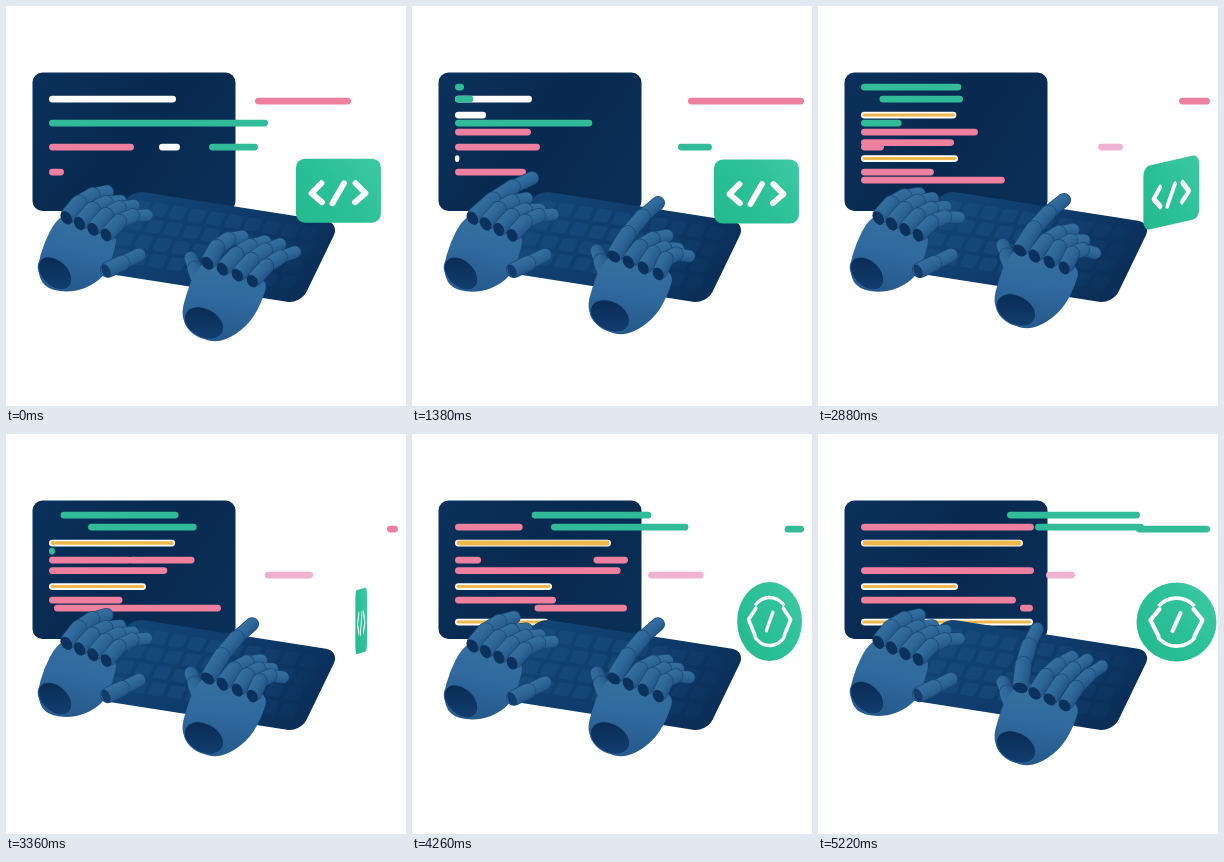
Recreate the animation shown at these times as an HTML page with a canvas. Size 400 by 400 pixels, loop 5.28 s.

```html
<!DOCTYPE html>
<html lang="en">
<head>
<meta charset="utf-8">
<title>Robot hands typing code</title>
<style>
html, body { margin: 0; width: 100%; height: 100%; overflow: hidden; background: #fff; }
canvas { display: block; width: 400px; height: 400px; }
</style>
</head>
<body>
<canvas id="stage"></canvas>
<script>
const LOOP = 5280, STEP = 60, EDGE = 43;
const canvas = document.getElementById('stage');
const ratio = window.devicePixelRatio || 1;
canvas.width = canvas.height = Math.round(400 * ratio);
const c = canvas.getContext('2d');
const PINK = '#ee7f9f', GREEN = '#31bb98', WHITE = '#ffffff', YELLOW = '#efb84f', ROSE = '#f0b2d2';

const clamp = (v, a = 0, b = 1) => Math.max(a, Math.min(b, v));
const mix = (a, b, u) => a + (b - a) * u;
const ease = (t, from, to) => {
  const u = clamp((t - from) / (to - from));
  return u * u * (3 - 2 * u);
};
const pulse = (t, peak, reach) => ease(t, peak - reach, peak) - ease(t, peak, peak + reach);

// Straight moves between (time, value) pairs, held at both ends.
const path = (...p) => t => {
  let i = 0;
  while (i < p.length - 4 && t >= p[i + 2]) i += 2;
  return mix(p[i + 1], p[i + 3], clamp((t - p[i]) / (p[i + 2] - p[i])));
};

function gradient(x0, y0, x1, y1, ...stops) {
  const g = c.createLinearGradient(x0, y0, x1, y1);
  stops.forEach((s, i) => g.addColorStop(i / (stops.length - 1), s));
  return g;
}

function box(x, y, w, h, r, fill) {
  c.beginPath();
  c.roundRect(x, y, w, h, r);
  c.fillStyle = fill;
  c.fill();
}

function oval(x, y, rx, ry, rot, fill) {
  c.beginPath();
  c.ellipse(x, y, rx, ry, rot, 0, Math.PI * 2);
  c.fillStyle = fill;
  c.fill();
}

function line(points, width, color) {
  c.beginPath();
  points.forEach(([x, y]) => c.lineTo(x, y));
  c.lineWidth = width;
  c.lineCap = c.lineJoin = 'round';
  c.strokeStyle = color;
  c.stroke();
}

// ---- code bars: shown from one time to another, each end has its own path ----
const bars = [];
const hold = x => () => x;
const edge = hold(EDGE);
const bar = (color, y, from, to, left, right) => bars.push({ color, y, from, to, left, right });

bar(WHITE, 93, 0, 1950, edge, path(0, 170, 1380, 120));
bar(PINK, 95, 0, 3950, t => 249 + 141 * ease(t, 400, 3900), path(0, 345, 1000, 392));
bar(GREEN, 95, 4000, LOOP, path(3920, 392, 5220, 318), hold(392));
bar(GREEN, 81, 1230, LOOP, path(3200, EDGE, 5220, 189), path(1230, EDGE, 3780, 198, 5220, 322));
bar(GREEN, 93, 1150, LOOP, path(2450, EDGE, 3780, 100, 5220, 217), path(1050, EDGE, 2880, 145, 4780, 326));
bar(PINK, 93, 3820, LOOP, edge, path(3780, EDGE, 4680, 170, 5220, 216));
bar(YELLOW, 109, 500, LOOP, edge, path(300, EDGE, 2280, 100, 3780, 196, 5220, 205));
bar(GREEN, 117, 0, 3400, edge, path(0, 262, 2280, 127, 3400, 46));
bar(PINK, 126, 450, 3000, edge, path(400, EDGE, 1380, 119, 2280, 160));
bar(PINK, 126, 3000, 5100, edge, path(3000, 165, 3780, 80, 5100, 50));
bar(PINK, 126, 3000, 4740, path(3000, 100, 3780, 148, 4740, 215), path(3000, 165, 3780, 216));
bar(PINK, 136.5, 2000, LOOP, edge, path(2100, 95, 4400, 216));
bar(PINK, 141, 0, 3150, edge, path(1900, 128, 3100, 52));
bar(WHITE, 141, 0, 700, path(0, 153, 700, 168), hold(174));
bar(GREEN, 141, 0, 2500, path(0, 203, 1380, 266, 2400, 293), path(0, 252, 1050, 300));
bar(ROSE, 141, 2500, LOOP, path(2500, 297, 3780, 240, 5220, 228), path(2500, 303, 3780, 309, 5220, 257));
bar(YELLOW, 152.5, 1340, LOOP, edge, path(1330, EDGE, 2450, 140));
bar(PINK, 166, 0, LOOP, edge, path(0, 58, 1380, 114, 3780, 117, 5220, 198));
bar(PINK, 174, 1540, LOOP, path(3300, EDGE, 5220, 202), path(1500, EDGE, 3150, 215));
bar(YELLOW, 188, 3600, LOOP, edge, path(3580, EDGE, 4680, 194, 5220, 215));

function drawBars(t) {
  for (const { color, y, from, to, left, right } of bars) {
    if (t < from || t > to) continue;
    const l = left(t), w = Math.max(4, right(t) - l);
    const warm = color === YELLOW;
    box(l, y - 3.3, w, 6.8, 3.4, warm ? WHITE : color);
    if (warm && t > 1500 && w > 6) {
      const core = 2.8 * ease(t, 1400, 2400) + (y < 110 ? 2 * ease(t, 2900, 3900) : 0);
      box(l + 1.5, y - core / 2, w - 3, core, core / 2, YELLOW);
    }
  }
}

// ---- screen and keyboard ----
function drawScreen() {
  box(26.5, 66.5, 203, 138.5, 10, gradient(27, 66, 229, 204, '#0b315c', '#08294f', '#0b3059'));
}

function drawKeyboard() {
  c.save();
  c.transform(.985, .155, -.43, .89, 124, 184);
  box(0, 0, 213, 91, 14, gradient(20, 0, 200, 70, '#124476', '#0e3b6b', '#0b2f59'));
  c.globalAlpha = .45;
  const tone = gradient(0, 0, 205, 0, '#1c5086', '#1c5086', '#0d3560');
  for (let row = 0; row < 4; row++)
    for (let col = 0; col < 10; col++)
      box(10 + col * 19 + (row % 2) * 3, 9 + row * 18, 15, 14, 3, tone);
  c.restore();
}

// ---- badge: a card that turns over into a disc ----
function drawBadge(t) {
  const u = t / 5220;
  const turn = clamp((t - 2170) * .069, 0, 180) * Math.PI / 180;
  const flip = turn > Math.PI / 2;
  const squash = Math.max(.03, Math.abs(Math.cos(turn)));
  const shear = flip ? 0 : -.3 * Math.sin(turn);
  c.save();
  c.translate(332.5 + 26 * (1 - (1 - u) ** 2), 184.7 + 3.4 * u);
  c.transform(squash, squash * shear, 0, 1, 0, 0);
  const fill = gradient(-40, 30, 40, -30, '#25b990', '#2cc098', '#3cc9a4');
  if (flip) {
    oval(0, 0, 40, 39.5, 0, fill);
    for (const s of [-1, 1]) {
      c.beginPath();
      c.arc(0, 0, 24, s * Math.PI / 2 - .85, s * Math.PI / 2 + .85);
      c.lineWidth = 3.6;
      c.strokeStyle = WHITE;
      c.stroke();
      line([[s * 17, -13], [s * 26, -2], [s * 18, 14]], 4.2, WHITE);
    }
    line([[4, -9], [-4, 9]], 4, WHITE);
  } else {
    box(-42.5, -32, 85, 64, 9, fill);
    for (const s of [-1, 1])
      line([[s * 17, -7.5], [s * 27, 2.5], [s * 16.5, 11.5]], 5.8, WHITE);
    line([[5.5, -7.5], [-6, 12.5]], 5.8, WHITE);
  }
  c.restore();
}

// ---- hands ----
const left = {
  knuckle: i => [62 + 13.3 * i, 209 + 5.8 * i],
  palm: [[31, 260], [38, 235], [50, 212], [66, 203], [92, 212], [112, 227], [107, 248], [99, 268], [80, 281], [58, 285], [37, 279]],
  wrist: [49, 265.5, 20, 13.5, .75],
  thumb: [[102, 262], [133, 247]],
  bob: t => 2 * Math.cos((t - 1380) / 1500 * 2 * Math.PI),
  reach(t, i) {
    const lift = i ? 0 : pulse(t, 1380, 500) + pulse(t, 4680, 480);
    const curl = pulse(t, 3780, 500);
    return [39 + 19 * lift - 8 * curl, -25 + 2 * i - 13 * lift - 6 * curl];
  }
};
const right = {
  knuckle: i => [203 + 15 * i, 247 + 6 * i],
  palm: [[175, 300], [180, 280], [188, 258], [204, 242], [232, 249], [262, 265], [257, 284], [245, 307], [225, 323], [205, 328], [183, 316]],
  wrist: [198, 308, 21.5, 15, .5],
  thumb: [[192, 262], [185, 243]],
  bob: t => 9 - 13 * ease(t, 0, 2600) + 9 * ease(t, 4700, 5220),
  reach(t, i) {
    const lift = ease(t, 300, 1200), swing = ease(t, 4750, 5220);
    if (!i) return [33 + 10 * lift - 27 * swing, -25 - 26 * lift - 5 * swing];
    const tuck = 4 * i * lift * (1 - swing);
    return [41 - tuck - 5 * swing, -28 + tuck - 9 * swing];
  }
};

function segment(a, b, w) {
  const dx = b[0] - a[0], dy = b[1] - a[1], d = Math.hypot(dx, dy) || 1;
  const nx = dy / d * w / 2, ny = -dx / d * w / 2;
  line([a, b], w, '#17477a');
  line([a, b], w - 1.4, gradient(a[0] + nx, a[1] + ny, a[0] - nx, a[1] - ny, '#35719f', '#2e679a', '#235586'));
}

function finger(k, [dx, dy], w) {
  const d = Math.hypot(dx, dy);
  const bend = Math.max(4, (66 - d) * .3);
  const at = u => {
    const lift = 4 * u * (1 - u) * bend;
    return [k[0] + dx * u + dy / d * lift, k[1] + dy * u - dx / d * lift];
  };
  segment(at(.72), at(1), w - 3);
  segment(at(.38), at(.7), w - 1);
  segment(at(.04), at(.36), w);
  oval(k[0] - dx / d * 2, k[1] - dy / d * 2, 5, w / 2 - 1.2, Math.atan2(dy, dx), '#0b315c');
}

function palm(points, fill) {
  const mid = (a, b) => [(a[0] + b[0]) / 2, (a[1] + b[1]) / 2];
  const n = points.length;
  c.beginPath();
  c.moveTo(...mid(points[n - 1], points[0]));
  points.forEach((p, i) => c.quadraticCurveTo(...p, ...mid(p, points[(i + 1) % n])));
  c.closePath();
  c.fillStyle = fill;
  c.fill();
}

function drawHand(hand, t) {
  const [wx, wy, rx, ry, rot] = hand.wrist;
  const [base, end] = hand.thumb;
  const middle = [mix(base[0], end[0], .45), mix(base[1], end[1], .45)];
  const top = hand.palm[3], low = hand.palm[9];
  const drawThumb = () => {
    segment(middle, end, 14);
    segment(base, middle, 16);
  };
  c.save();
  c.translate(0, hand.bob(t));
  if (hand === right) drawThumb();
  palm(hand.palm, gradient(top[0] + 10, top[1], low[0], low[1], '#35719f', '#2f699e', '#245889'));
  if (hand === left) {
    drawThumb();
    oval(base[0] - 2, base[1] + 1, 4, 7, -.45, '#123d6b');
  }
  oval(wx, wy, rx, ry, rot, '#2b6299');
  oval(wx, wy, rx - 1, ry - 1, rot, gradient(wx, wy - 16, wx, wy + 18, '#0a2c55', '#123f70'));
  for (let i = 0; i < 4; i++) {
    const [dx, dy] = hand.reach(t, i);
    const tap = 2 * Math.sin(t / LOOP * 12 * Math.PI + i * 2.1);
    finger(hand.knuckle(i), [dx, dy + tap], 17 - i * .4);
  }
  c.restore();
}

function draw(t) {
  c.setTransform(ratio, 0, 0, ratio, 0, 0);
  c.fillStyle = WHITE;
  c.fillRect(0, 0, 400, 400);
  drawScreen();
  drawBars(t);
  drawKeyboard();
  drawBadge(t);
  drawHand(left, t);
  drawHand(right, t);
}

const start = performance.now();
function tick() {
  const t = (performance.now() - start) % LOOP;
  draw(Math.floor(t / STEP) * STEP);
  requestAnimationFrame(tick);
}
tick();
</script>
</body>
</html>
```
